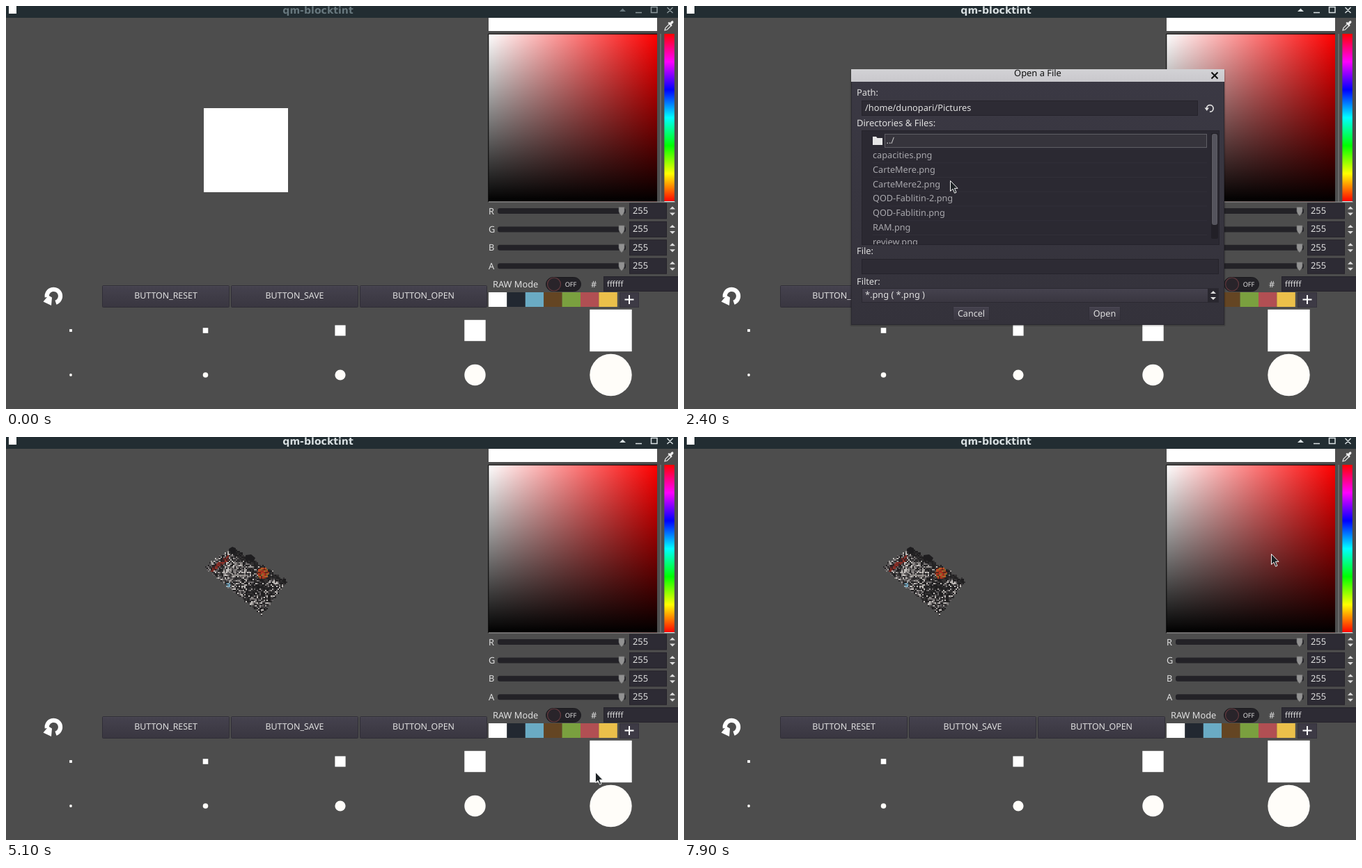
Recreate the animation shown at these times as an HTML page. Size 965 by 580 pixels, loop 8000 ms.

```html
<!DOCTYPE html>
<html lang="en">
<head>
<meta charset="utf-8">
<title>Pixel editor</title>
<style>
html, body { margin: 0; width: 100%; height: 100%; overflow: hidden; background: #4d4d4d; }
svg { display: block; width: 965px; height: 580px; }
text { font-family: "Noto Sans", "Open Sans", sans-serif; font-size: 12.7px; fill: #e0e0e0;
  font-variant-ligatures: none; text-rendering: geometricPrecision; white-space: pre; }
</style>
</head>
<body>
<svg id="stage" viewBox="0 0 965 580" xmlns="http://www.w3.org/2000/svg"></svg>
<script>
const LOOP = 8000, STEP = 100;
const FIELD = '#2d2b34', EDGE = '#25232b';

const rect = (x, y, w, h, fill, more = '') =>
  `<rect x="${x}" y="${y}" width="${w}" height="${h}" fill="${fill}" ${more}/>`;
const path = (d, fill, more = '') => `<path d="${d}" fill="${fill}" ${more}/>`;
const circle = (x, y, r, fill, more = '') => `<circle cx="${x}" cy="${y}" r="${r}" fill="${fill}" ${more}/>`;
const label = (x, y, s, size = 12.8, more = '') =>
  `<text x="${x}" y="${y}" style="font-size:${size}px" ${more}>${s}</text>`;
const mid = 'text-anchor="middle"';
const gradient = (id, stops, dir = 'x2="0" y2="1"') =>
  `<linearGradient id="${id}" ${dir}>` + stops.map(([o, c, a = 1]) =>
    `<stop offset="${o}" stop-color="${c}" stop-opacity="${a}"/>`).join('') + '</linearGradient>';
const field = (x, y, w, h) => rect(x + .5, y + .5, w - 1, h - 1, FIELD, `stroke="${EDGE}"`);
const arrows = (x, y) => path(`M${x - 4} ${y - 2.5}l4 -4l4 4zM${x - 4} ${y + 2.5}l4 4l4 -4z`, '#dedede');

function button(x, y, w, h, text, size, base, id = '') {
  return rect(x + .5, y + .5, w - 1, h - 1, 'url(#btn)', `stroke="#302e37" rx="1" ${id}`) +
    path(`M${x + 1.5} ${y + 1.5}h${w - 3}`, 'none', 'stroke="#4c4955"') +
    label(x + w / 2, base, text, size, mid);
}

function defs() {
  const hue = ['#f00', '#f0f', '#00f', '#0ff', '#0f0', '#ff0', '#f00'].map((c, i) => [i / 6, c]);
  return '<defs>' +
    gradient('btn', [[0, '#45424e'], [1, '#393640']]) +
    gradient('btnHot', [[0, '#57545f'], [1, '#46434e']]) +
    gradient('sat', [[0, '#fff'], [1, '#f00']], 'x2="1" y2="0"') +
    gradient('val', [[0, '#000', 0], [1, '#000']]) +
    gradient('hue', hue) +
    gradient('bar', [[0, '#d2d2d5'], [1, '#c9c8cc']]) +
    gradient('body', [[0, '#3b3944'], [1, '#34323b']]) +
    '<clipPath id="listClip"><rect x="257" y="180" width="510" height="163"/></clipPath></defs>';
}

function titleBar() {
  return rect(0, 0, 965, 17, '#222d32') + rect(4, 0, 11, 11, '#fff') +
    '<g id="title">' +
    `<text x="448" y="10.5" ${mid} style="font:bold 14.1px 'DejaVu Sans',sans-serif;fill:inherit">qm-blocktint</text>` +
    path('M881 8l4.5 -4.5l4.5 4.5z', 'inherit') +
    path('M904 9.5h9M926.5 1.5h8.500v8h-8.500zM949.5 2l8 8m0 -8l-8 8', 'none', 'stroke-width="1.500"') + '</g>';
}

function picker() {
  let s = rect(693, 17, 242, 19, '#fff') +
    rect(693, 40, 242, 241.5, 'url(#sat)') + rect(693, 40, 242, 241.5, 'url(#val)') +
    path('M692.8 282V40.300H935', 'none', 'stroke="#000"') +
    path('M693 282H961', 'none', 'stroke="#929292"') +
    path('M940 40V282', 'none', 'stroke="#858585"') +
    rect(945.4, 40, 14.4, 241.5, 'url(#hue)') + rect(945.4, 281, 14.4, 1, '#bff') +
    path('M946 35l1 -3.500l6 -6l2.500 2.500l-6 6z', 'none', 'stroke="#e8e8e8" stroke-width="1.2"') +
    path('M950.5 24.500l1.500 -1.500l1.800 1l1.500 -2q2.200 -1.500 3 .2q.6 1.500 -.8 2.700l-1.700 1.400l.8 1.800l-1.500 1.500z', '#eee');
  'RGBA'.split('').forEach((ch, i) => {
    const y = 295 + i * 26.4;
    s += label(693, y + 4.5, ch) +
      rect(706, y - 4, 184, 8, '#232227', 'rx="3"') +
      path(`M880 ${y - 5.5}h8v6q-.5 3.500 -4 6.500q-3.500 -3 -4 -6.500z`, '#929292', 'stroke="#6b6b6b" stroke-width=".7"') +
      field(895, y - 11.5, 54, 23) + label(900, y + 4, '255', 12.9) + arrows(957, y);
  });
  s += label(699, 404.5, 'RAW Mode') +
    rect(775.5, 390.5, 50, 20, '#222126', 'rx="10" stroke="#1a191d"') +
    circle(787, 400.5, 9.5, '#29242a', 'stroke="#62393e" stroke-width="1.2"') +
    label(811, 404, 'OFF', 9.2, mid + ' font-weight="500"') +
    label(840, 404.5, '#') + field(858, 389, 108, 22) + label(863, 404, 'ffffff', 11.3);
  ['#fff', '#222831', '#6aabc4', '#644523', '#7aa03f', '#b14f53', '#ebc04a'].forEach((c, i) => {
    s += rect(693 + i * 26.4, 412, 26.4, 21, c);
  });
  return s + rect(881.5, 412.5, 27, 21, '#3d3a45', 'stroke="#34323b"') +
    path('M888.500 422.500h13m-6.500 -6.500v13', 'none', 'stroke="#fff" stroke-width="2"');
}

function tools() {
  let s = path('M71.5 426.700A9.700 9.700 0 1 0 58.800 419', 'none', 'stroke="#fff" stroke-width="6.200"') +
    path('M53.500 425.500L61 416.500L66 419.500L65 431z', '#fff') +
    button(138, 402, 183, 32, 'BUTTON_RESET', 12.4, 421) +
    button(323, 402, 183, 32, 'BUTTON_SAVE', 12.4, 421) +
    button(508, 402, 183, 32, 'BUTTON_OPEN', 12.4, 421, 'id="open"');
  [93, 286.5, 480, 673.5, 868.5].forEach((x, i) => {
    const r = 1.9 * 2 ** i - (i === 4 ? .2 : 0);
    s += rect(x - r, 467 - r, 2 * r, 2 * r, '#fff') + circle(x, 531, r, '#fffdf9');
  });
  return s;
}

// Speckled circuit board inside a tilted quad, made of 2px cells
function board() {
  let seed = 11;
  const rnd = () => (seed = seed * 16807 % 2147483647) / 2147483647;
  const quad = [[285, 187], [325, 159], [404, 207], [367, 256]];
  const depth = (x, y) => Math.min(...quad.map(([ax, ay], i) => {
    const [bx, by] = quad[(i + 1) % 4], dx = bx - ax, dy = by - ay;
    return (dx * (y - ay) - dy * (x - ax)) / Math.hypot(dx, dy);
  }));
  const pick = list => list[Math.floor(rnd() * list.length)];
  const dark = ['#222122', '#2a292a', '#343233', '#1e1d1f'];
  const light = ['#4c494a', '#656163', '#7f7b7a', '#9f9b99', '#c2bebb'];
  const cells = {};
  for (let y = 158; y < 258; y += 2) for (let x = 284; x < 406; x += 2) {
    const d = depth(x + 1, y + 1);
    if (d < rnd() * 3 - 1.5) continue;
    const ram = Math.abs((y - 182) + .72 * (x - 306)) < 4 && x > 293 && x < 319;
    const fan = Math.hypot(x - 368, y - 195) < 8.5;
    const chip = Math.hypot((x - 328) / 17, (y - 190) / 11);
    const slot = x > 340 && Math.abs((y - 213) + .95 * (x - 364)) < 5 || x > 366 && y > 208 && (x + y) % 14 < 6;
    let c;
    if (fan) c = pick(['#b5351f', '#92301d', '#bd5a28', '#5c2a1c', '#80702f']);
    else if (ram) c = pick(['#7a2a24', '#8d3028', '#3b2324', '#2a2021']);
    else if (Math.hypot(x - 318, y - 212) < 4) c = pick(['#78a7bd', '#98abb4', '#426f86']);
    else {
      const top = x > 318 && y - 159 < .608 * (x - 325) + 9;
      const share = top ? .06 : slot ? .15 : chip < 1 ? .75 : d < 12 ? .55 : .42;
      c = rnd() < share ? pick(light) : pick(dark);
    }
    cells[c] = (cells[c] || '') + `M${x} ${y}h2v2h-2z`;
  }
  return Object.entries(cells).map(([c, d]) => path(d, c)).join('') +
    path('M320 161l5 -3l5 2v7l-6 2zM344 170l8 -1l6 5l-3 6l-11 -4z', '#1e1d1f') +
    path('M319 193l8 6h16', 'none', 'stroke="#aaa6a2" stroke-width="1.500"');
}

function dialog() {
  const files = ['capacities', 'CarteMere', 'CarteMere2', 'QOD-Fablitin-2', 'QOD-Fablitin', 'RAM', 'review'];
  let rows = path('M271 188h5l1.500 2h7.500v10h-14z', '#e6e6e6') + label(290.5, 198, '../', 12.8, 'fill-opacity=".85"');
  files.forEach((name, i) => {
    const y = 219.2 + i * 20.75;
    rows += path(`M271 ${y - 14.2}H751`, 'none', 'stroke="#312f38"') +
      `<text x="271" y="${y}" ${i === 2 ? 'id="pick"' : ''} style="fill:#a9a8ad">${name}.png</text>`;
  });
  return rect(238.5, 91, 539, 370, '#000', 'opacity=".16" rx="2"') +
    rect(240.5, 91.5, 535, 367, 'url(#body)', 'stroke="#2a2830"') +
    rect(240, 91, 536, 18, 'url(#bar)') +
    label(508, 101, 'Open a File', 12.9, mid + ' id="cap"') +
    path('M757.500 95.500l9 9m0 -9l-9 9', 'none', 'stroke="#111" stroke-width="2"') +
    label(248, 129, 'Path:') + field(255, 136, 483, 22) +
    label(260, 150.5, '/home/dunopari/Pictures') +
    path('M755 152.200A4.800 4.800 0 1 0 750.500 147', 'none', 'stroke="#e0e0e0" stroke-width="1.700"') +
    path('M747.500 146.500h6.500l-3.200 4.500z', '#e0e0e0') +
    label(248, 172.5, 'Directories &amp; Files:', 13) +
    rect(255.5, 179.5, 513, 164, '#2b2932', 'id="list"') +
    '<g clip-path="url(#listClip)">' +
    rect(288.5, 184.5, 462, 19, '#36343c', 'id="focus" stroke="#5f5e65"') +
    rect(271.5, 248.5, 479, 17, '#4b4a51', 'id="sel" stroke="#6b6a70" rx="1"') + rows + '</g>' +
    rect(757, 183, 10, 152, '#222027', 'rx="2"') +
    rect(758.5, 184.5, 7, 130, '#55545d', 'rx="2" stroke="#5c5b63"') +
    label(248, 357, 'File:') + field(255, 364, 513, 22) + label(260, 379, 'CarteMere2.png', 12.6, 'id="name"') +
    label(248, 400.5, 'Filter:') +
    rect(255.5, 406.5, 512, 20, 'url(#btn)', 'stroke="#2b2931"') +
    rect(752, 407, 15, 19, '#29272f') + arrows(760, 416.5) +
    label(260, 420, '*.png ( *.png )') +
    button(386, 432, 53, 21, 'Cancel', 12.6, 447) + button(581, 432, 46, 21, 'Open', 12.6, 447);
}

const stage = document.getElementById('stage');
stage.innerHTML = defs() + rect(0, 0, 965, 580, '#4d4d4d') + titleBar() +
  rect(284, 147, 121, 121, '#fff', 'id="blank"') + `<g id="board">${board()}</g>` +
  picker() + tools() + `<g id="dialog">${dialog()}</g>` +
  '<g id="cursor">' + path('M.5 .5V15.500L4 12.300L6.600 18.300L9 17.200L6.400 11.400H11z', '#1c2124',
    'stroke="#f4f4f4" stroke-width="1"') + '</g>';

const $ = id => document.getElementById(id);
const show = (id, on) => { $(id).style.display = on ? '' : 'none'; };
$('cap').style.fill = '#111';

// Pointer path: time, x, y
const keys = [
  [100, 157, 24], [500, 400, 250], [900, 570, 411], [1200, 570, 411], [2100, 391, 283], [2400, 382, 251],
  [2600, 382, 251], [2800, 383, 242], [3000, 370, 249], [3100, 370, 249], [3600, 375, 255],
  [4400, 375, 255], [4800, 640, 372], [5100, 846, 482], [5300, 849, 469], [5500, 640, 411],
  [5700, 640, 411], [6000, 852, 470], [6100, 833, 472], [6600, 486, 279], [6800, 456, 259],
  [6900, 456, 259], [7300, 640, 326], [7800, 866, 150], [7900, 843, 168]
];

function pointer(t) {
  const i = keys.findIndex(k => k[0] > t);
  if (i < 0) return keys[keys.length - 1].slice(1);
  if (i === 0) return keys[0].slice(1);
  const [t0, x0, y0] = keys[i - 1], [t1, x1, y1] = keys[i], p = (t - t0) / (t1 - t0);
  return [x0 + (x1 - x0) * p, y0 + (y1 - y0) * p].map(Math.round);
}

function draw(time) {
  const t = Math.floor(time % LOOP / STEP) * STEP;
  const [x, y] = pointer(t);
  const active = t >= 1000, asking = t >= 1100 && t < 3900, picked = t >= 3300;
  $('title').setAttribute('fill', active ? '#d8dfe1' : '#67777d');
  $('title').lastChild.setAttribute('stroke', active ? '#d8dfe1' : '#8b979b');
  show('blank', t < 1100);
  show('board', t >= 3900);
  show('dialog', asking);
  show('focus', !picked);
  show('sel', picked);
  show('name', picked);
  $('pick').style.fill = picked ? '#f4f4f4' : '#a9a8ad';
  $('list').setAttribute('stroke', picked ? '#3f6591' : EDGE);
  const hot = !asking && t >= 100 && x >= 508 && x < 691 && y >= 402 && y < 434;
  $('open').setAttribute('fill', hot ? 'url(#btnHot)' : 'url(#btn)');
  show('cursor', t >= 100);
  $('cursor').setAttribute('transform', `translate(${x} ${y})`);
}

function tick() {
  draw(performance.now());
  requestAnimationFrame(tick);
}
tick();
</script>
</body>
</html>
```
